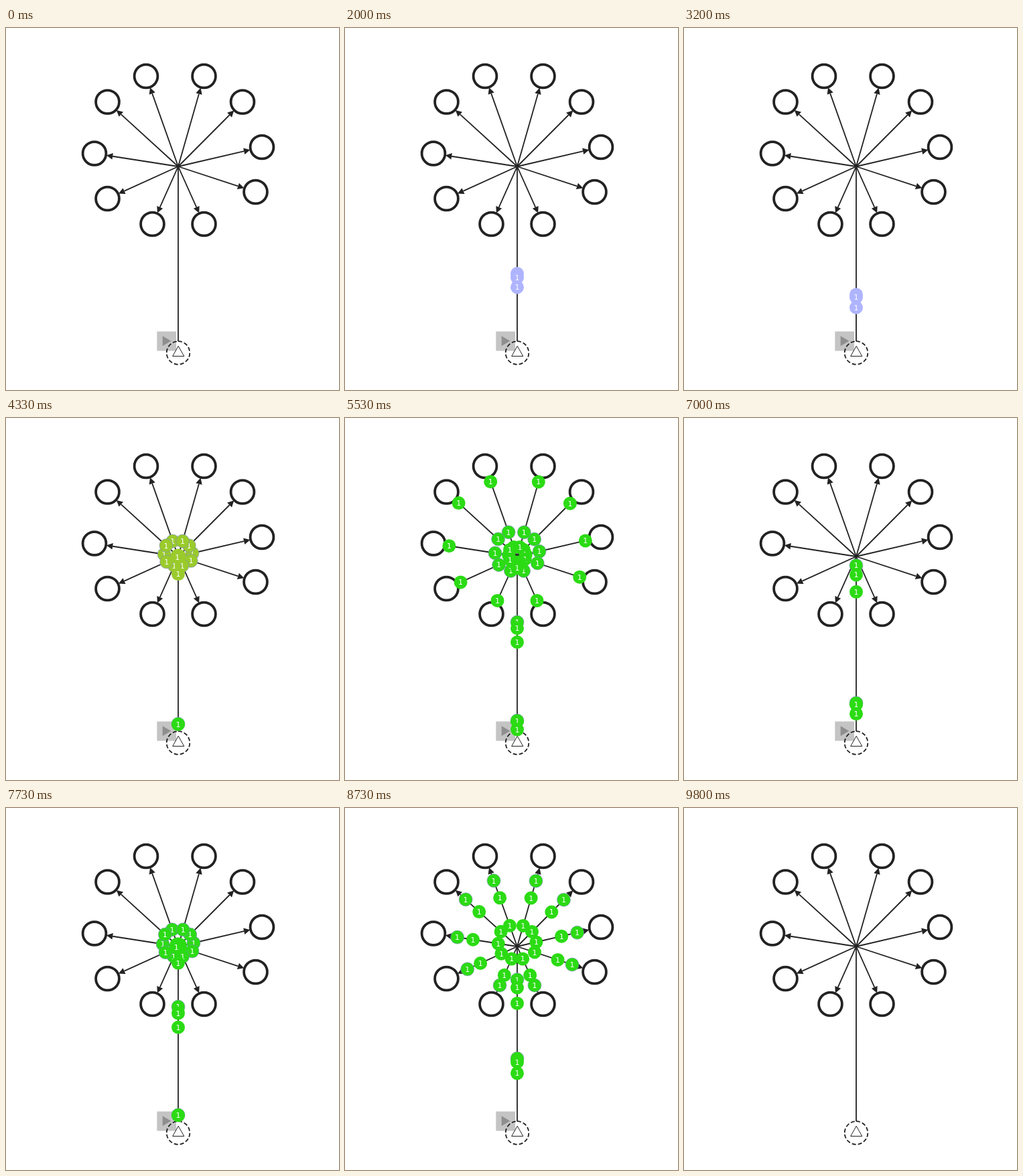
Recreate the animation shown at these times as an HTML page with a canvas. Size 497 px wide and 541 px high, loop 9990 ms.

```html
<!DOCTYPE html>
<html lang="en">
<head>
<meta charset="utf-8">
<title>Flow diagram</title>
<style>
  html, body { margin: 0; width: 100%; height: 100%; overflow: hidden; background: #fff; }
  canvas { display: block; }
</style>
</head>
<body>
<canvas id="stage" width="497" height="541"></canvas>
<script>
const ctx = document.getElementById('stage').getContext('2d');
const LOOP = 9990, FPS = 15, END = 9.8;
const INK = '#222', LILAC = '#afb4ff', OLIVE = '#9acb2b', GREEN = '#2bdb14';
const HUB = { x: 257, y: 207 }, STEM_Y = 468;

// Pools, in the order their tokens are stacked
const pools = [
  [382, 178], [353, 110.5], [372.5, 245], [295.5, 293], [218.5, 293],
  [209, 72], [295.5, 72], [132, 187.5], [151.5, 110.5], [151.5, 255]
].map(([x, y]) => {
  const dx = x - HUB.x, dy = y - HUB.y, len = Math.hypot(dx, dy);
  const ux = dx / len, uy = dy / len;
  return { x, y, ux, uy, reach: len - 18 };
});

// Each launch sends three tokens; the slowest leaves a little later
const ARM = 0.33;
const runners = [
  { speed: 1.24, delay: 0, rim: true },
  { speed: 1.17, delay: 0 },
  { speed: 1.1, delay: 0.04 }
];
const launches = [1.6, 2.985, 3.475, 4.3, 4.645, 5.03, 5.485, 5.745,
  6.235, 6.87, 7.205, 7.705, 8.08, 8.444].map((at, i) => ({
  at,
  pace: i ? 1 : 0.78,
  color: i < 2 ? LILAC : i < 3 ? OLIVE : GREEN
}));

function line(x1, y1, x2, y2) {
  ctx.beginPath();
  ctx.moveTo(x1, y1);
  ctx.lineTo(x2, y2);
  ctx.stroke();
}

function ring(x, y, r) {
  ctx.beginPath();
  ctx.arc(x, y, r, 0, Math.PI * 2);
}

function polygon(...pts) {
  ctx.beginPath();
  pts.forEach(([x, y]) => ctx.lineTo(x, y));
  ctx.closePath();
}

function drawPool({ x, y, ux, uy, reach }) {
  const tipX = HUB.x + ux * reach, tipY = HUB.y + uy * reach;
  const backX = tipX - ux * 9.5, backY = tipY - uy * 9.5;
  ctx.strokeStyle = ctx.fillStyle = INK;
  ctx.lineWidth = 1.8;
  line(HUB.x, HUB.y, backX, backY);
  ctx.lineWidth = 3.8;
  ring(x, y, 17.4);
  ctx.stroke();
  polygon([tipX, tipY], [backX - uy * 4.8, backY + ux * 4.8], [backX + uy * 4.8, backY - ux * 4.8]);
  ctx.fill();
}

function drawSource(running) {
  ctx.strokeStyle = INK;
  ctx.lineWidth = 1.8;
  line(HUB.x, HUB.y, HUB.x, STEM_Y);
  ctx.setLineDash([6, 3.06]);
  ctx.beginPath();
  ctx.arc(257, 485.5, 17.3, -Math.PI / 2, Math.PI * 1.5);
  ctx.stroke();
  ctx.setLineDash([]);
  ctx.lineWidth = 1;
  polygon([257.2, 475.3], [248.7, 490.5], [265.8, 490.5]);
  ctx.stroke();
  if (!running) return;
  ctx.fillStyle = 'rgba(0,0,0,.23)';
  ctx.fillRect(225.3, 453.5, 28.7, 29);
  ctx.fillStyle = '#8e8e8e';
  polygon([233.7, 460.3], [233.7, 475.3], [246.3, 467.8]);
  ctx.fill();
}

function drawToken(x, y, color, rim) {
  ctx.fillStyle = color;
  ring(x, y, 10);
  ctx.fill();
  if (rim) {
    ctx.strokeStyle = 'rgba(125,135,200,.75)';
    ctx.lineWidth = 0.8;
    ring(x, y, 10);
    if (color !== LILAC) ctx.stroke();
  }
  ctx.fillStyle = '#fff';
  ctx.fillText('1', x, y + 4);
}

function drawRunner({ speed, delay, rim }, { at, pace, color }, time) {
  const p = (time - at - delay) * speed * pace;
  if (p < -1e-9 || p >= 1 + ARM) return;
  if (p < 1) {
    drawToken(HUB.x, STEM_Y + (HUB.y - STEM_Y) * p, color, rim);
    return;
  }
  const part = (p - 1) / ARM;
  for (const { ux, uy, reach } of pools) {
    drawToken(HUB.x + ux * reach * part, HUB.y + uy * reach * part, color, rim);
  }
}

function draw(ms) {
  // The picture advances in steps of 1/15 s
  const time = Math.floor(ms * FPS / 1000 + 0.06) / FPS;
  ctx.fillStyle = '#fff';
  ctx.fillRect(0, 0, 497, 541);
  pools.forEach(drawPool);
  drawSource(time < END - 1e-6);
  ctx.font = '11px "DejaVu Sans", sans-serif';
  ctx.textAlign = 'center';
  for (const launch of launches) {
    for (const runner of runners) drawRunner(runner, launch, time);
  }
}

const start = performance.now();
function tick() {
  draw((performance.now() - start) % LOOP);
  requestAnimationFrame(tick);
}
tick();
</script>
</body>
</html>
```
